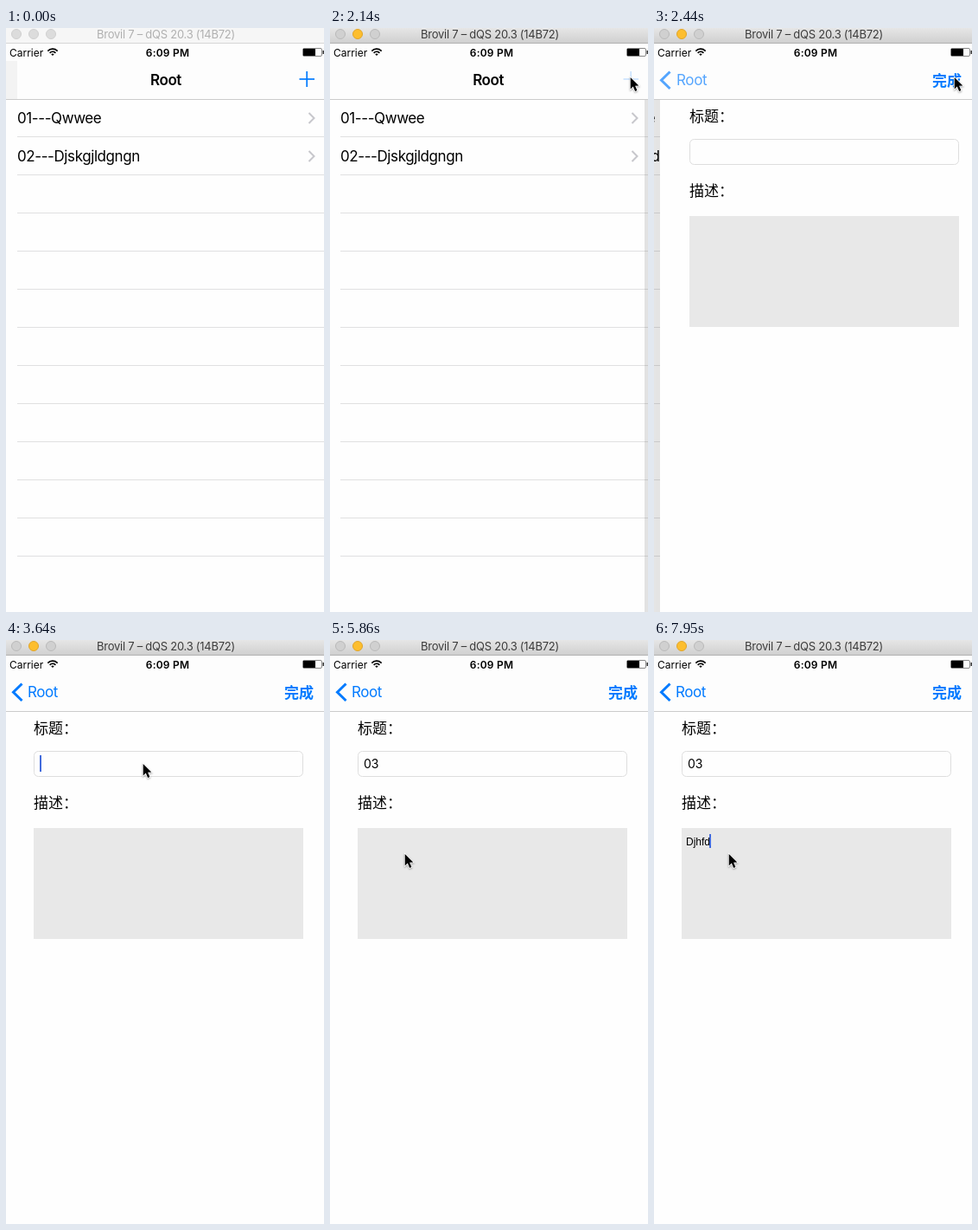
Animation of 368x674 px, one loop 8 s. Source, as an HTML page with a canvas:

```html
<!DOCTYPE html>
<html lang="zh-CN">
<head>
<meta charset="utf-8">
<style>
html, body { margin: 0; height: 100%; overflow: hidden; background: #fefefe; }
canvas { display: block; }
</style>
</head>
<body>
<canvas id="stage" width="368" height="674"></canvas>
<script>
const ctx = document.getElementById('stage').getContext('2d');
const W = 368, H = 674, LOOP = 8000, TICK = 149;
const BLUE = '#007aff', WHITE = '#fefefe', SANS = 'Inter, sans-serif';
const CJK = '"Noto Sans CJK SC", "Noto Sans CJK", sans-serif';
const FOCUS = 9, PUSH = 11;

// Pointer path: tick, x, y
const path = [[0, 215, 168], [3, 251, 129], [6, 283, 95], [8, 340, 61], [9, 347, 56],
  [13, 347, 56], [14, 292, 108], [15, 216, 132], [17, 158, 142], [33, 158, 142], [36, 86, 246]];
const titleText = [[29, '0'], [31, '03']];
const titleCaret = [[21, 1], [24, .5], [25, 0], [27, 1], [34, .5], [35, 0], [38, 1], [39, 0]];
const noteText = [[46, 'D'], [47, 'Dj'], [49, 'Djhf'], [50, 'Djhfd']];
const noteCaret = [[39, 1], [45, .5], [46, 1]];

const clamp = v => Math.max(0, Math.min(1, v));

function hold(keys, n, value) {
  for (const [k, v] of keys) if (n >= k) value = v;
  return value;
}

function rect(x, y, w, h, color) {
  ctx.fillStyle = color;
  ctx.fillRect(x, y, w, h);
}

function line(points, color, width) {
  ctx.beginPath();
  points.forEach(([x, y]) => ctx.lineTo(x, y));
  ctx.strokeStyle = color;
  ctx.lineWidth = width;
  ctx.stroke();
}

function text(str, x, y, font, color = '#000', spacing = 0, align = 'left') {
  ctx.font = font;
  ctx.letterSpacing = spacing + 'px';
  ctx.textAlign = align;
  ctx.fillStyle = color;
  ctx.fillText(str, x, y);
  return ctx.measureText(str).width;
}

function faded(alpha, draw) {
  if (alpha <= 0) return;
  ctx.save();
  ctx.globalAlpha = Math.min(1, alpha);
  draw();
  ctx.restore();
}

function windowBar(active) {
  const g = ctx.createLinearGradient(0, 0, 0, 17);
  g.addColorStop(0, active ? '#e6e6e6' : '#f6f6f6');
  g.addColorStop(1, active ? '#d0d0d0' : '#f6f6f6');
  rect(0, 0, W, 17, g);
  rect(0, 17, W, 1, active ? '#b1b1b1' : '#d6d6d6');
  [12, 32, 52].forEach((x, i) => {
    const yellow = active && i === 1;
    ctx.beginPath();
    ctx.arc(x, 7, 5.5, 0, 7);
    ctx.fillStyle = yellow ? '#fdbe2e' : active ? '#d0d0d0' : '#dcdcdc';
    ctx.fill();
    ctx.strokeStyle = yellow ? '#e0a52a' : active ? '#bababa' : '#d0d0d0';
    ctx.lineWidth = 1;
    ctx.stroke();
  });
  text('Brovil 7 – dQS 20.3 (14B72)', 185, 12, '13px ' + SANS,
    active ? '#3c3c3c' : '#b0b0b0', -.26, 'center');
}

function statusBar() {
  text('Carrier', 4, 32.5, '12px ' + SANS);
  text('6:09 PM', 187, 32.5, '600 12px ' + SANS, '#000', .2, 'center');
  [1.2, 4.6, 7.8].forEach(r => {
    ctx.beginPath();
    ctx.arc(54, 32, r, -Math.PI * .76, -Math.PI * .24);
    ctx.strokeStyle = '#000';
    ctx.lineWidth = r < 2 ? 2.4 : 1.7;
    ctx.stroke();
  });
  ctx.beginPath();
  ctx.roundRect(343.5, 23.5, 22, 9, 1.5);
  ctx.strokeStyle = '#888';
  ctx.lineWidth = 1;
  ctx.stroke();
  rect(344, 24, 14, 8, '#000');
  rect(366.5, 26, 1.5, 4, '#333');
}

function navBar(n, left) {
  rect(0, 18, W, 64, '#fdfdfd');
  if (n < PUSH) rect(0, 38, 13, 44, '#f3f3f3');
  rect(0, 82, W, 1, '#cbcbcb');
  statusBar();
  const step = n - PUSH;
  const x = 25 + 142 * Math.pow(left, 1.3);
  const shown = clamp(step / 3);
  faded(1 - step / 1.5, () => text('Root', x, 66, '600 17px ' + SANS, '#000', -.41));
  faded(shown, () => {
    text('Root', x, 66, '17px ' + SANS, BLUE, -.41);
    line([[18.5, 50.5], [8.5, 60.3], [18.5, 70]], BLUE, 3);
  });
  faded(n < 10 ? 1 : n <= PUSH ? .2 : 0, () => {
    line([[339.5, 59], [357, 59]], BLUE, 1.7);
    line([[348.2, 50], [348.2, 68]], BLUE, 1.7);
  });
  faded(step / 2, () => text('完成', 322, 66.5, '600 17px ' + CJK, BLUE));
}

function list(dx) {
  ctx.save();
  ctx.translate(dx, 0);
  ['01---Qwwee', '02---Djskgjldgngn'].forEach((name, i) => {
    const y = 104 + 44 * i;
    text(name, 13, y + 6, '17px ' + SANS, '#000', -.41);
    line([[350.5, y - 6], [356.5, y], [350.5, y + 6]], '#c7c7cc', 2);
  });
  for (let y = 125; y < 620; y += 44) rect(13, y, 500, 1, '#e0e0e1');
  ctx.restore();
}

function caret(x, y, h, alpha) {
  faded(alpha, () => rect(Math.round(x), y, 2, h, '#426bdc'));
}

function form(dx, n) {
  ctx.save();
  ctx.translate(dx, 0);
  rect(-2, 83, 400, H, WHITE);
  text('标题：', 32, 107.5, '17px ' + CJK);
  text('描述：', 32, 193.5, '17px ' + CJK);
  ctx.beginPath();
  ctx.roundRect(32.5, 128.5, 311, 29, 5);
  ctx.strokeStyle = '#dedede';
  ctx.lineWidth = 1;
  ctx.stroke();
  rect(32, 217, 312, 128, '#e8e8e8');
  const w1 = text(hold(titleText, n, ''), 39, 148, '14px ' + SANS, '#000', -.1);
  caret(38.8 + w1, 133, 19, hold(titleCaret, n, 0));
  const w2 = text(hold(noteText, n, ''), 37, 236.5, '12px "Liberation Sans", sans-serif');
  caret(36.2 + w2, 224, 16, hold(noteCaret, n, 0));
  ctx.restore();
}

function pointer(n) {
  if (n < 0) return;
  let i = 0;
  while (i < path.length - 2 && n > path[i + 1][0]) i++;
  const [n0, x0, y0] = path[i], [n1, x1, y1] = path[i + 1];
  const k = clamp((n - n0) / (n1 - n0));
  ctx.save();
  ctx.translate(Math.round(x0 + (x1 - x0) * k), Math.round(y0 + (y1 - y0) * k));
  ctx.beginPath();
  [[.7, 1], [.7, 14.5], [3.8, 11.6], [6.1, 17], [8.4, 16], [6.1, 10.8], [10.3, 10.6]]
    .forEach(([x, y]) => ctx.lineTo(x, y));
  ctx.closePath();
  ctx.shadowColor = 'rgba(0,0,0,.35)';
  ctx.shadowBlur = 2;
  ctx.shadowOffsetY = 1;
  ctx.strokeStyle = '#fff';
  ctx.lineWidth = 1.6;
  ctx.stroke();
  ctx.shadowColor = 'transparent';
  ctx.fillStyle = '#000';
  ctx.fill();
  ctx.restore();
}

function draw(t) {
  const n = Math.floor((t - 500) / TICK + .05);
  // Share of the push still to go, decaying exponentially
  const left = n < PUSH ? 1 : n > 14 ? 0 : .99 * Math.pow(6.5, PUSH - n);
  const dx = Math.round(375 * left);
  rect(0, 0, W, H, WHITE);
  if (left > 0) {
    list(-Math.round(112 * (1 - left)));
    rect(0, 83, dx - 2, H, `rgba(0,0,0,${.1 * (1 - left)})`);
    if (n >= PUSH) rect(dx - 7, 83, 5, H, `rgba(0,0,0,${.11 * left})`);
  }
  if (n >= PUSH) form(dx, n);
  navBar(n, left);
  windowBar(n >= FOCUS);
  pointer(n);
}

const start = performance.now();
function loop() {
  draw((performance.now() - start) % LOOP);
  requestAnimationFrame(loop);
}
loop();
</script>
</body>
</html>
```
